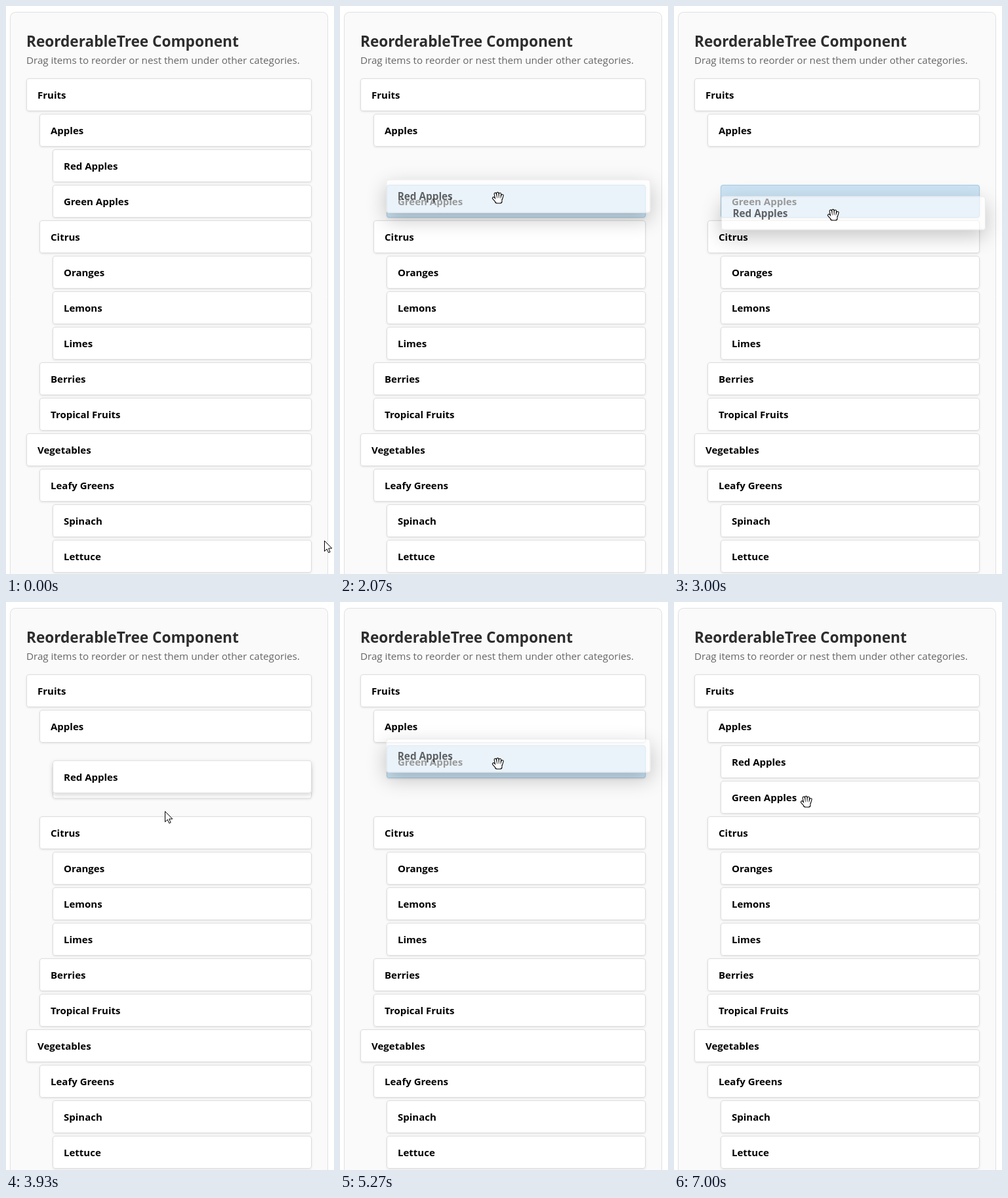
An HTML page with a canvas that plays this animation: 500 by 864 pixels, repeating every 8000 ms.

```html
<!DOCTYPE html>
<html lang="en">
<head>
<meta charset="utf-8">
<title>Reorderable tree</title>
<style>
  html, body { margin: 0; width: 100%; height: 100%; overflow: hidden; background: #fff; }
  canvas { display: block; width: 500px; height: 864px; }
</style>
</head>
<body>
<canvas id="stage"></canvas>
<script>
const W = 500, H = 864, LOOP = 8000, FPS = 15;
const FONT = '"Open Sans", "Noto Sans", sans-serif';
const canvas = document.getElementById('stage');
const ctx = canvas.getContext('2d');
const dpr = window.devicePixelRatio || 1;
canvas.width = W * dpr;
canvas.height = H * dpr;

const LEFT = 31, RIGHT = 466, TOP = 110, INDENT = 20, ROW_H = 50, PITCH = 54;
const outline = `
Fruits
 Apples
  Red Apples
  Green Apples
 Citrus
  Oranges
  Lemons
  Limes
 Berries
 Tropical Fruits
Vegetables
 Leafy Greens
  Spinach
  Lettuce`;
const rows = outline.slice(1).split('\n').map((line, i) => ({
  label: line.trim(),
  x: LEFT + line.search(/\S/) * INDENT,
  y: TOP + i * PITCH
}));
const red = rows.find(r => r.label === 'Red Apples');
const green = rows.find(r => r.label === 'Green Apples');
const SLOT_A = red.y, SLOT_B = green.y;

// All times in seconds
const moves = [
  { from: 0, to: 0.65, x: 188, y: 164 },
  { from: 0.65, to: 0.87, x: 257, y: 207 },
  { from: 0.87, to: 1, x: 236, y: 249 },
  { from: 1.14, to: 1.27, x: 237, y: 246 },
  { from: 1.74, to: 2.27, x: 241, y: 302 },
  { from: 2.54, to: 3, x: 242, y: 318 },
  { from: 4.21, to: 4.53, x: 237, y: 309 },
  { from: 4.68, to: 5.6, x: 241, y: 234 },
  { from: 6.61, to: 7, x: 201, y: 304 }
];
const drags = [{ from: 1.46, to: 3.9 }, { from: 4.59, to: 6.15 }];
const SETTLE = 0.12;

const mix = (a, b, p) => a + (b - a) * p;
const easeOut = p => Math.sin(Math.min(Math.max(p, 0), 1) * Math.PI / 2);
const settle = age => easeOut(age / SETTLE);

function pointerAt(t) {
  let x = 485, y = 813;
  for (const m of moves) {
    const p = easeOut((t - m.from) / (m.to - m.from));
    x = mix(x, m.x, p);
    y = mix(y, m.y, p);
  }
  return { x, y };
}

const contains = (row, p) =>
  p.x >= row.x && p.x < RIGHT && p.y >= row.y && p.y < row.y + ROW_H;

function box(x, y, w, h, r) {
  ctx.beginPath();
  ctx.roundRect(x, y, w, h, r);
}

function text(str, x, y, size, weight, color) {
  ctx.font = `${weight} ${size}px ${FONT}`;
  ctx.fillStyle = color;
  ctx.fillText(str, x, y);
}

function setShadow(dy, blur, alpha) {
  ctx.shadowColor = `rgba(0,0,0,${alpha})`;
  ctx.shadowOffsetY = dy * dpr;
  ctx.shadowBlur = blur * dpr;
}

function drawFace({ label, x, y }, hot) {
  const w = RIGHT - x;
  box(x, y, w, ROW_H, 4);
  ctx.fillStyle = hot ? '#cbe3f4' : '#fff';
  ctx.fill();
  ctx.shadowColor = 'transparent';
  box(x + 0.5, y + 0.5, w - 1, ROW_H - 1, 3.5);
  ctx.strokeStyle = hot ? '#a8cbe2' : '#ddd';
  ctx.lineWidth = 1;
  ctx.stroke();
  text(label, x + 17, y + 31, 15, 700, '#000');
}

function drawRow(row, hot, raised) {
  ctx.save();
  if (raised) setShadow(3, 7, 0.16);
  else setShadow(1, 3, 0.1);
  drawFace(row, hot);
  ctx.restore();
}

function drawLifted(row, dx, dy) {
  const w = RIGHT - row.x, cx = row.x + w / 2, cy = row.y + ROW_H / 2;
  ctx.save();
  ctx.translate(cx + dx, cy + dy);
  ctx.scale(1.02, 1.02);
  ctx.translate(-cx, -cy);

  // Shadow only outside the translucent card
  ctx.save();
  ctx.beginPath();
  ctx.rect(-W, -H, W * 3, H * 3);
  ctx.roundRect(row.x, row.y, w, ROW_H, 4);
  ctx.clip('evenodd');
  setShadow(10, 31, 0.23);
  box(row.x, row.y, w, ROW_H, 4);
  ctx.fillStyle = '#fff';
  ctx.fill();
  ctx.restore();

  ctx.globalAlpha = 0.6;
  drawFace(row);
  ctx.restore();
}

function drawArrow(x, y) {
  ctx.save();
  ctx.translate(Math.round(x) + 0.5, Math.round(y) + 0.5);
  ctx.fillStyle = '#fff';
  ctx.strokeStyle = '#000';
  ctx.lineWidth = 1;
  ctx.stroke(ctx.fill(arrow) || arrow);
  ctx.restore();
}
const arrow = new Path2D('M0 0V16L3.7 12.5 6.2 18 8.6 17 6.2 11.5H11.3Z');

// Four fanned fingers and a thumb, black strokes under thinner white ones
function drawHand(x, y) {
  const fingers = new Path2D('M-7 .3L-3.2 4.5');
  for (let i = 0; i < 4; i++) {
    fingers.moveTo(-4.3 + 3.6 * i, -7 + 0.8 * (i - 1) ** 2);
    fingers.lineTo(-2.8 + 2.6 * i, 1);
  }
  ctx.save();
  ctx.translate(Math.round(x) + 1, Math.round(y));
  ctx.lineCap = 'round';
  for (const [color, width, edge] of [['#000', 4.3, 1.2], ['#fff', 2.2, 0.2]]) {
    ctx.strokeStyle = ctx.fillStyle = color;
    ctx.lineWidth = width;
    ctx.stroke(fingers);
    box(-3.8 - edge, 0.2, 9 + 2 * edge, 7.2 + edge, 3);
    ctx.fill();
  }
  ctx.restore();
}

function drawPanel() {
  ctx.fillStyle = '#fff';
  ctx.fillRect(0, 0, W, H);
  box(6.5, 9.5, 484, H + 40, 8);
  ctx.fillStyle = '#fafafa';
  ctx.strokeStyle = '#e0e0e0';
  ctx.lineWidth = 1;
  ctx.fill();
  ctx.stroke();
  text('ReorderableTree Component', LEFT, 62, 22.6, 700, '#2d2d2d');
  text('Drag items to reorder or nest them under other categories.', LEFT, 88, 15.17, 400, '#666');
}

function draw(t) {
  const pointer = pointerAt(t);
  const drag = drags.find(d => t >= d.from && t < d.to);
  const swapped = settle(t - drags[0].to) - settle(t - drags[1].to);
  red.y = mix(SLOT_A, SLOT_B, swapped);
  green.y = mix(SLOT_B, SLOT_A, swapped);
  const still = rows.filter(r => r !== red);

  ctx.setTransform(dpr, 0, 0, dpr, 0, 0);
  drawPanel();
  for (const row of still) drawRow(row, drag && contains(row, pointer));
  if (drag) {
    const grab = pointerAt(drag.from);
    drawLifted(red, pointer.x - grab.x, pointer.y - grab.y);
  } else {
    drawRow(red, false, swapped > 0 && swapped < 1);
  }

  const over = (drag ? still : rows).some(r => contains(r, pointer));
  (over ? drawHand : drawArrow)(pointer.x, pointer.y);
}

const start = performance.now();
function loop() {
  const t = (performance.now() - start) % LOOP;
  draw(Math.floor((t + 4) * FPS / 1000) / FPS);
  requestAnimationFrame(loop);
}
loop();
</script>
</body>
</html>
```
